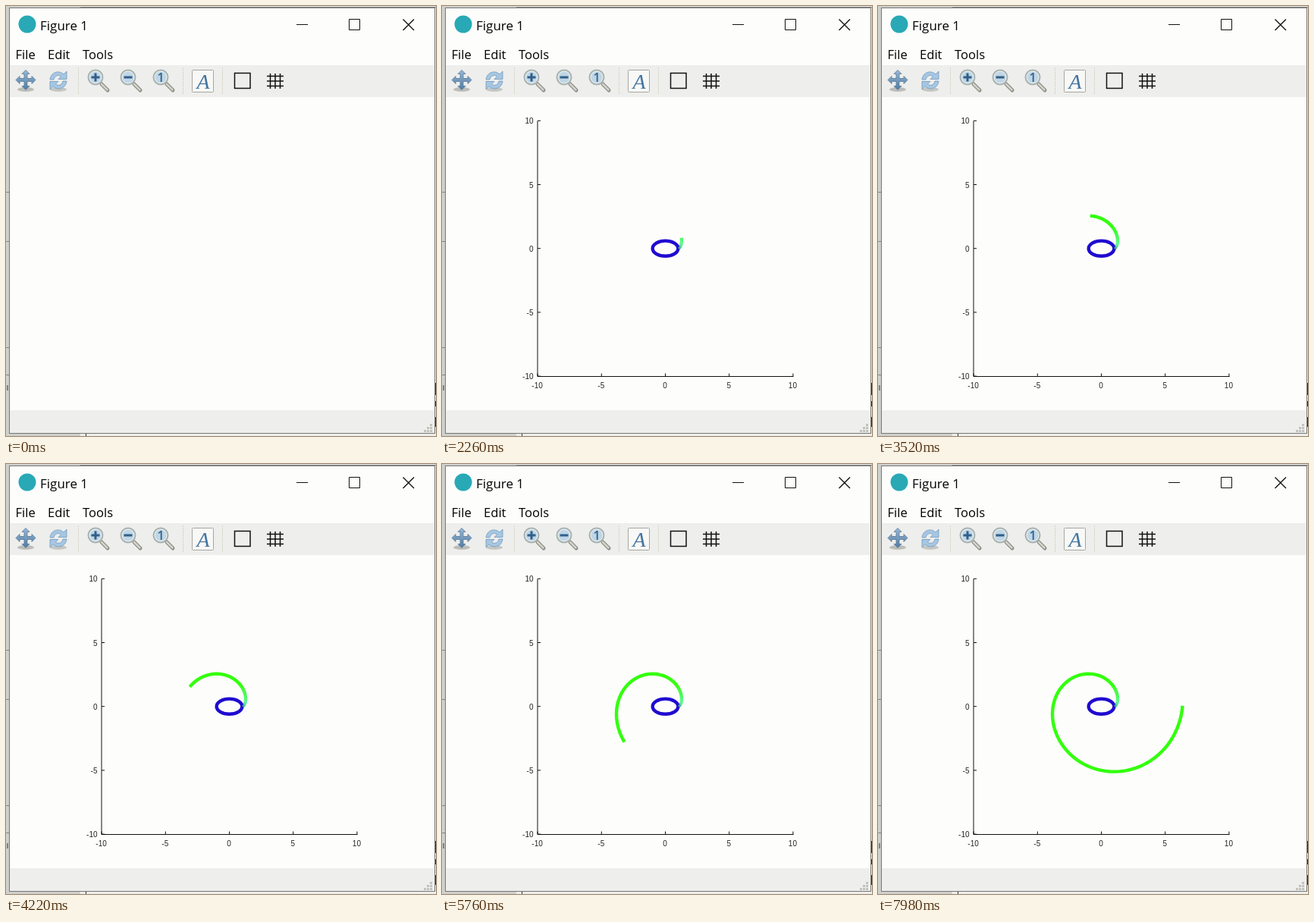
Write an HTML page that moves like this. It is 567x567 px and loops after 8000 ms.

```html
<!DOCTYPE html>
<html lang="en">
<head>
<meta charset="utf-8">
<title>Ellipse involute</title>
<style>
  html, body { margin: 0; width: 100%; height: 100%; overflow: hidden; }
  svg { display: block; width: 100vw; height: 100vh; }
  .ui { font: 17px "Open Sans", "Noto Sans", sans-serif; fill: #000; }
  .menu { font-size: 16.6px; }
  .ticks { font: 10px "Liberation Sans", Arial, sans-serif; fill: #262626; }
  .line { fill: none; stroke: #111; }
</style>
</head>
<body>
<svg viewBox="0 0 567 567">
  <defs>
    <linearGradient id="steel" x2="0" y2="1">
      <stop stop-color="#9ab9d6"/><stop offset="1" stop-color="#4f7ba3"/>
    </linearGradient>
    <radialGradient id="fade" gradientUnits="userSpaceOnUse" cx="313" cy="319" r="28">
      <stop stop-color="#55c8a0"/><stop offset=".2" stop-color="#62f796"/>
      <stop offset=".5" stop-color="#4dfa5c"/><stop offset="1" stop-color="#33ff0d"/>
    </radialGradient>
    <g id="lens">
      <path d="M5 5L13 13" stroke="#8c8c86" stroke-width="5" stroke-linecap="round"/>
      <path d="M5 5L12.5 12.5" stroke="#d3d3ca" stroke-width="2.5" stroke-linecap="round"/>
      <circle cx="-3" cy="-4" r="9.5" fill="#e6eeee" stroke="#a9b2b2" stroke-width="2"/>
      <circle cx="-3" cy="-4" r="7.3" fill="#bfd6e6"/>
    </g>
  </defs>

  <!-- desktop edges around the window -->
  <rect width="567" height="567" fill="#ededea"/>
  <path d="M0 0H98V2H5V567H0Z" fill="#cfcfcb"/>
  <path d="M0 564H98V567H0Z" fill="#cfcfcb"/>
  <path d="M0 245.5H4M0 310.5H4M0 450.5H4M0 486.5H4M98 1.5H567" stroke="#858580"/>
  <path d="M2 500V507M566.5 497V513M566.5 521V528M566.5 542V555M105.5 564V567" stroke="#333"/>

  <!-- window -->
  <rect x="4.5" y="2.5" width="561" height="561" fill="#fdfdfc" stroke="#777"/>
  <path d="M5 78H565V120H5ZM5 533H565V563H5Z" fill="#eeeeec"/>
  <circle cx="28" cy="24" r="11.5" fill="#28a9b5"/>
  <g class="ui">
    <text x="45" y="32">Figure 1</text>
    <g class="menu">
      <text x="12.5" y="70">File</text>
      <text x="55" y="70">Edit</text>
      <text x="101" y="70">Tools</text>
    </g>
  </g>
  <path class="line" d="M383 24.5H398M452.5 17.5H466.5V31.5H452.5Z"/>
  <path class="line" stroke-width="1.4" d="M523.5 17.5L538 32M538 17.5L523.5 32"/>

  <!-- toolbar -->
  <path d="M95.5 81V117M233.5 81V117M285.5 81V117" stroke="#d4d4c4" stroke-dasharray="2 1"/>
  <ellipse cx="26" cy="110" rx="11" ry="3" fill="#bcbcb8"/>
  <path transform="translate(26 97.5)" fill="url(#steel)" stroke="#56799a" stroke-width=".8"
    d="M0-13L5-8H2V-2H8V-5L13 0L8 5V2H2V8H5L0 13L-5 8H-2V2H-8V5L-13 0L-8-5V-2H-2V-8H-5Z"/>
  <ellipse cx="69" cy="110" rx="11" ry="3" fill="#c6c6c2"/>
  <g transform="translate(69 98)" fill="#a6c6e2" stroke="#6f9abd" stroke-width=".8">
    <path id="turn" d="M-11-1C-10-11 1-14 7-8L11-12V-1.5H0L3.5-5C0-8-5-6-6-1Z"/>
    <use href="#turn" transform="rotate(180)"/>
  </g>
  <use href="#lens" x="121" y="98"/>
  <use href="#lens" x="164" y="98"/>
  <use href="#lens" x="207" y="98"/>
  <path d="M112.5 94H123.5M118 88.5V99.5M155.5 94H166.5" stroke="#315f88" stroke-width="3"/>
  <text x="204" y="100" text-anchor="middle" fill="#315f88" font-family="Open Sans, sans-serif" font-size="16" font-weight="600">1</text>
  <rect x="245.5" y="84.5" width="28" height="29" rx="1" fill="#f8f8f6" stroke="#a6a6a0"/>
  <text x="260" y="109" text-anchor="middle" fill="#4676a0" font-family="Liberation Serif, serif" font-size="28" font-style="italic">A</text>
  <rect class="line" x="301.5" y="88.5" width="20.5" height="20" stroke-width="1.5"/>
  <path class="line" stroke-width="1.5" d="M348.5 89V109M355 89V109M361.5 89V109M344 92.5H366M344 99H366M344 105.5H366"/>
  <path d="M559 551H562V554H559ZM555 555H558V558H555ZM559 555H562V558H559ZM551 559H554V562H551ZM555 559H558V562H555ZM559 559H562V562H559Z" fill="#c2c2bc"/>

  <!-- plot -->
  <g id="plot">
    <path id="axes" class="line" stroke="#333"/>
    <g id="labels" class="ticks"></g>
    <path id="involute" fill="none" stroke="url(#fade)" stroke-width="4.4" stroke-linejoin="round"/>
    <ellipse id="ellipse" fill="none" stroke="#1f0bd0" stroke-width="4.4"/>
    <circle id="join" r="1.6" fill="#45a58d"/>
  </g>
</svg>
<script>
const LOOP = 8000, START = 120, BURST = 140;
const CX = 294.5, CY = 319.7, UNIT = 16.84, MINOR = 0.6;
// [drawing step, curve parameter]
const PROGRESS = [[9, 0], [20, 0.5], [63, 2.63], [89, 3.77], [122, 5.5], [146, 6.555], [169, 7.71]];

const el = id => document.getElementById(id);
const px = x => CX + x * UNIT;
const py = y => CY - y * UNIT;

function drawAxes() {
  const left = 126, bottom = 488.5;
  let path = `M${left} 151.5V${bottom}H463.5`, labels = "";
  for (let v = -10; v <= 10; v += 5) {
    path += `M${left} ${py(v)}h4M${px(v)} ${bottom}v-4`;
    labels += `<text x="120.5" y="${py(v) + 4}" text-anchor="end">${v}</text>` +
              `<text x="${px(v) - 0.5}" y="504" text-anchor="middle">${v}</text>`;
  }
  el("axes").setAttribute("d", path);
  el("labels").innerHTML = labels;
  const ring = { cx: CX, cy: CY, rx: UNIT, ry: UNIT * MINOR };
  for (const name in ring) el("ellipse").setAttribute(name, ring[name]);
  el("join").setAttribute("cx", px(1.1));
  el("join").setAttribute("cy", py(0.05));
}

// Three steps per burst: two short, one long.
function stepAt(time) {
  const t = time - START;
  return 3 * Math.floor(t / BURST) + Math.min(2, Math.floor(t % BURST / 20));
}

function parameterAt(step) {
  if (step <= PROGRESS[0][0]) return 0;
  const i = PROGRESS.findIndex(([s]) => step <= s);
  if (i < 0) return PROGRESS.at(-1)[1];
  const [s0, p0] = PROGRESS[i - 1], [s1, p1] = PROGRESS[i];
  return p0 + (p1 - p0) * (step - s0) / (s1 - s0);
}

const speed = t => Math.hypot(Math.sin(t), MINOR * Math.cos(t));

// A taut string unwinding from the ellipse.
function involutePath(end) {
  const count = Math.max(1, Math.ceil(end / 0.03)), dt = end / count;
  let length = 0, path = "";
  for (let i = 0; i <= count; i++) {
    const t = i * dt, v = speed(t);
    if (i) length += speed(t - dt / 2) * dt;
    const x = Math.cos(t) + length * Math.sin(t) / v;
    const y = MINOR * (Math.sin(t) - length * Math.cos(t) / v);
    path += `${i ? "L" : "M"}${px(x).toFixed(2)} ${py(y).toFixed(2)}`;
  }
  return path;
}

function render(now) {
  const time = now % LOOP, visible = time >= START;
  el("plot").style.display = visible ? "" : "none";
  if (visible) {
    const end = parameterAt(stepAt(time));
    el("involute").setAttribute("d", end > 0 ? involutePath(end) : "");
    el("join").style.display = end > 0.4 ? "" : "none";
  }
  requestAnimationFrame(() => render(performance.now()));
}

drawAxes();
render(performance.now());
</script>
</body>
</html>
```
